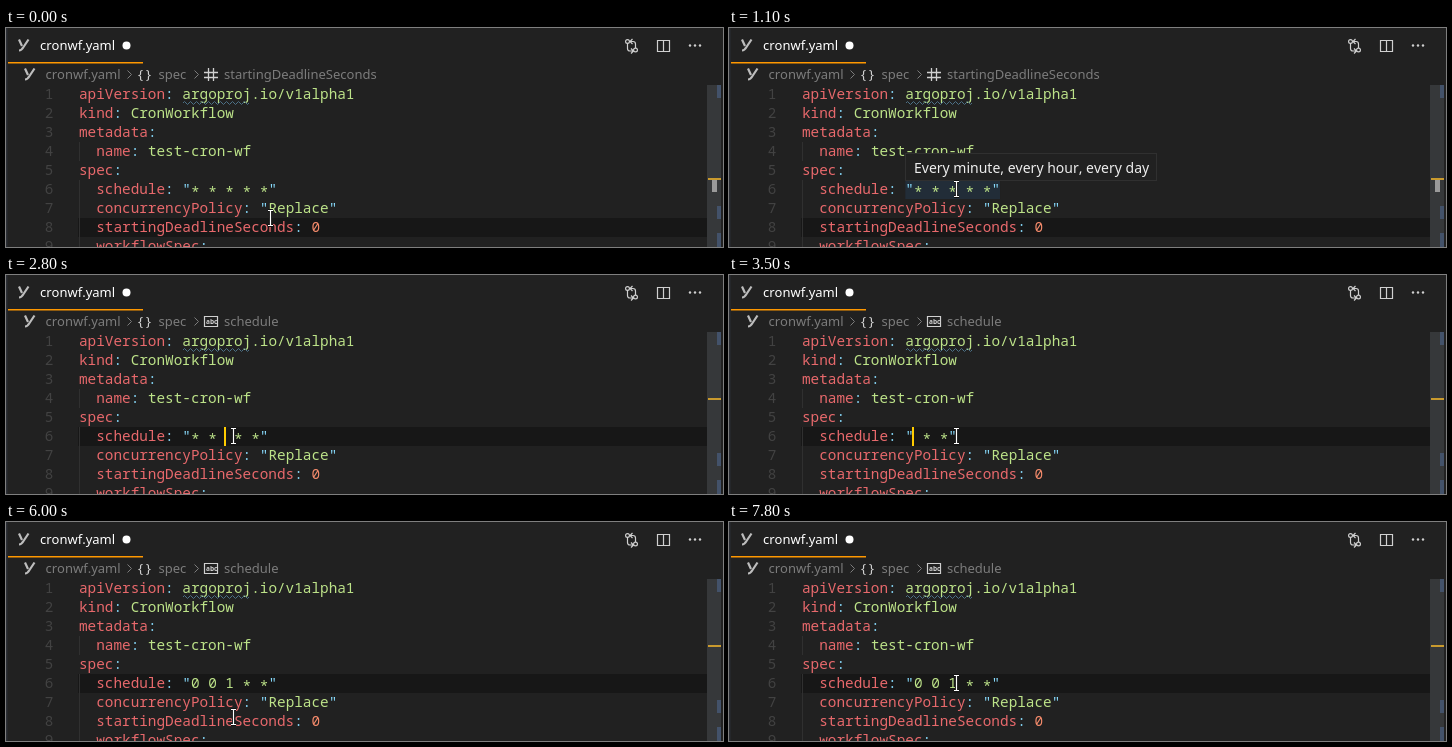
An HTML page with a canvas that plays this animation: 717 by 219 pixels, repeating every 8 s.

```html
<!DOCTYPE html>
<html lang="en">
<head>
<meta charset="utf-8">
<title>Cron schedule hover</title>
<style>
  html, body { margin: 0; width: 717px; height: 219px; overflow: hidden; background: #212121; }
  canvas { display: block; }
</style>
</head>
<body>
<canvas id="stage" width="717" height="219"></canvas>
<script>
const ctx = document.getElementById('stage').getContext('2d');
const LOOP = 8000, STEP = 100;
const LEFT = 73, TOP = 57, CHAR = 8.61, LINE = 19;
const MONO = '14.35px "Noto Sans Mono", monospace';
const UI = '13px "Noto Sans", sans-serif';
const TIP = '14px "Noto Sans", sans-serif';
const C = {
  bg: '#212121', key: '#e8696c', string: '#bde389', punct: '#89ddff', number: '#f78c6c',
  gutter: '#424242', crumb: '#7c7c7c', icon: '#d0d0d0', caret: '#ffcc00', accent: '#ff9800'
};
ctx.fontKerning = 'none';

// Each edit: time, schedule text, caret offset within it
const edits = [
  [0, '* * * * *', 5], [2800, '* *  * *', 4], [3100, '*  * *', 2], [3300, '* * *', 1],
  [3500, ' * *', 0], [4200, '0 * *', 1], [4300, '0  * *', 2], [4600, '0 0 * *', 3],
  [4900, '0 0  * *', 4], [5100, '0 0 1 * *', 5]
];
// Pointer positions: time, x, y
const pointer = [
  [0, 264.5, 190], [100, 272.5, 195], [200, 263.5, 188], [300, 250.5, 176], [400, 237.5, 165],
  [500, 229.5, 161], [700, 227.5, 161], [5800, 226.5, 169], [5900, 226.5, 186],
  [6000, 227.5, 195], [6100, 230.5, 188], [6200, 229.5, 171], [6300, 227.5, 161]
];
const hovers = [
  { from: 1000, to: 2100, text: 'Every minute, every hour, every day' },
  { from: 6500, to: 7800, text: 'At 00:00, on day 1 of the month' }
];

const latest = (list, t) => list.filter(item => item[0] <= t).pop();
const colX = col => LEFT + col * CHAR;
const rowY = row => TOP + (row - 1) * LINE;

function rect(x, y, w, h, color) {
  ctx.fillStyle = color;
  ctx.fillRect(x, y, w, h);
}
function text(str, x, y, color, font = UI) {
  ctx.font = font;
  ctx.fillStyle = color;
  ctx.fillText(str, x, y);
}
function stroke(path, color, width = 1) {
  ctx.strokeStyle = color;
  ctx.lineWidth = width;
  ctx.stroke(new Path2D(path));
}
function dot(x, y, r, color) {
  ctx.fillStyle = color;
  ctx.beginPath();
  ctx.arc(x, y, r, 0, Math.PI * 2);
  ctx.fill();
}

// Asterisks sit at mid height, so they are placed one by one
function code(row, col, str, color) {
  const y = rowY(row) + 14;
  text(str.replaceAll('*', ' '), colX(col), y, color, MONO);
  [...str].forEach((ch, i) => {
    if (ch === '*') text(ch, colX(col + i), y + 3, color, MONO);
  });
}
function entry(row, indent, key, value = '', color = C.string) {
  code(row, indent, key, C.key);
  code(row, indent + key.length, ':', C.punct);
  code(row, indent + key.length + 2, value, color);
}
function quoted(row, indent, key, value) {
  const col = indent + key.length + 2;
  entry(row, indent, key);
  code(row, col, '"', C.punct);
  code(row, col + 1, value, C.string);
  code(row, col + 1 + value.length, '"', C.punct);
}

function fileIcon(x, y) {
  stroke(`M${x + 1} ${y + 1}L${x + 4} ${y + 7.5}M${x + 10.5} ${y + 1}L${x + 5.5} ${y + 8.5}Q${x + 3.5} ${y + 12} ${x + 1} ${y + 12}`, '#bdbdbd', 2.2);
}

function drawHeader(onSchedule) {
  rect(0, 0, 1.5, 219, '#2b2e35');
  rect(2, 34, 135, 1.5, C.accent);
  fileIcon(12, 10.5);
  text('cronwf.yaml', 34, 22, '#ffffff');
  dot(120.5, 17.5, 4, '#ffffff');

  // Compare, split and more
  stroke('M621.5 15V20.5Q621.5 23 624 23H627M625 20.5L627.5 23L625 25.5M629.5 20V16Q629.5 13.5 627 13.5H624M626.5 11L624 13.5L626.5 16', C.icon, 1.2);
  for (const [x, y] of [[621.5, 13.5], [629.5, 22]]) {
    dot(x, y, 2.5, C.icon);
    dot(x, y, 1.3, C.bg);
  }
  stroke('M651.5 12.5H663.5V23.5H651.5ZM657.5 12V24', C.icon, 1.2);
  for (const x of [684, 689, 694]) dot(x, 17.5, 1.2, C.icon);

  fileIcon(18, 39.5);
  text('cronwf.yaml', 39.5, 51, C.crumb);
  stroke('M121.5 42.5L125.5 46.5L121.5 50.5M188.5 42.5L192.5 46.5L188.5 50.5', C.crumb);
  text('{}', 130.5, 51, C.icon, '13.3px "Noto Sans Mono", monospace');
  text('spec', 152.5, 51, C.crumb);
  if (onSchedule) {
    stroke('M198.5 41.5H211.5V51.5H198.5Z', C.icon, 1.2);
    text('abc', 200, 49, C.icon, 'bold 6.5px "Noto Sans", sans-serif');
  } else {
    stroke('M202.5 40V53M207.5 40V53M198 44.5H212M198 49.5H212', C.icon, 1.3);
  }
  text(onSchedule ? 'schedule' : 'startingDeadlineSeconds', 218, 51, C.crumb);
}

function drawRuler(clicked) {
  rect(701, TOP, 14, 162, '#36383a');
  for (const [y, h] of [[57, 13], [178, 13], [205, 14]]) rect(711, y, 4, h, '#43526a');
  rect(702, clicked ? 123 : 150, 13, 2, '#c99a2e');
  if (!clicked) rect(706, 152, 5, 12, '#9a9a9a');
}

function drawCode(schedule) {
  for (let row = 1; row <= 9; row++) {
    text(String(row), 38.8, rowY(row) + 14, C.gutter, MONO);
    if (row === 4 || row > 5) rect(73, rowY(row), 1, LINE, '#303030');
  }
  entry(1, 0, 'apiVersion', 'argoproj.io/v1alpha1');
  entry(2, 0, 'kind', 'CronWorkflow');
  entry(3, 0, 'metadata');
  entry(4, 2, 'name', 'test-cron-wf');
  entry(5, 0, 'spec');
  quoted(6, 2, 'schedule', schedule);
  quoted(7, 2, 'concurrencyPolicy', 'Replace');
  entry(8, 2, 'startingDeadlineSeconds', '0', C.number);
  entry(9, 2, 'workflowSpec');
  stroke('M177 75' + 'q1.5 -3 3 0t3 0'.repeat(11), '#4c7086');
}

function drawTooltip(label) {
  ctx.font = TIP;
  const width = Math.round(ctx.measureText(label).width) + 17;
  rect(176, 125, width, 28, '#212121');
  ctx.lineWidth = 1;
  ctx.strokeStyle = '#303030';
  ctx.strokeRect(176.5, 125.5, width - 1, 27);
  text(label, 185, 144.5, '#eeeeee', TIP);
}

function drawPointer(t) {
  const [, x, y] = latest(pointer, t);
  const beam = `M${x - 2.5} ${y - 7.5}H${x + 2.5}M${x} ${y - 7.5}V${y + 7.5}M${x - 2.5} ${y + 7.5}H${x + 2.5}`;
  stroke(beam, '#111111', 3);
  stroke(beam, '#ffffff', 1.2);
}

function draw(t) {
  const [editTime, schedule, caret] = latest(edits, t);
  const clicked = t >= 2100;
  const hover = hovers.find(h => t >= h.from && t < h.to);

  rect(0, 0, 717, 219, C.bg);
  rect(72, rowY(clicked ? 6 : 8), 629, LINE, '#171717');
  if (hover) rect(colX(12), rowY(6), CHAR * 11, LINE, clicked ? '#1b2530' : '#222d38');
  drawHeader(t >= 2300);
  drawRuler(clicked);
  drawCode(schedule);

  const blinkStart = Math.max(editTime, 2300);
  if (t >= blinkStart && (t - blinkStart) % 1000 < 500) {
    rect(Math.floor(colX(13 + caret)) - 1, rowY(6), 2, LINE, C.caret);
  }
  if (hover) {
    ctx.globalAlpha = t < hover.from + STEP ? 0.5 : 1;
    drawTooltip(hover.text);
    ctx.globalAlpha = 1;
  }
  drawPointer(t);
}

const start = performance.now();
function frame() {
  const t = (performance.now() - start) % LOOP;
  draw(Math.floor(t / STEP) * STEP);
  requestAnimationFrame(frame);
}
frame();
</script>
</body>
</html>
```
